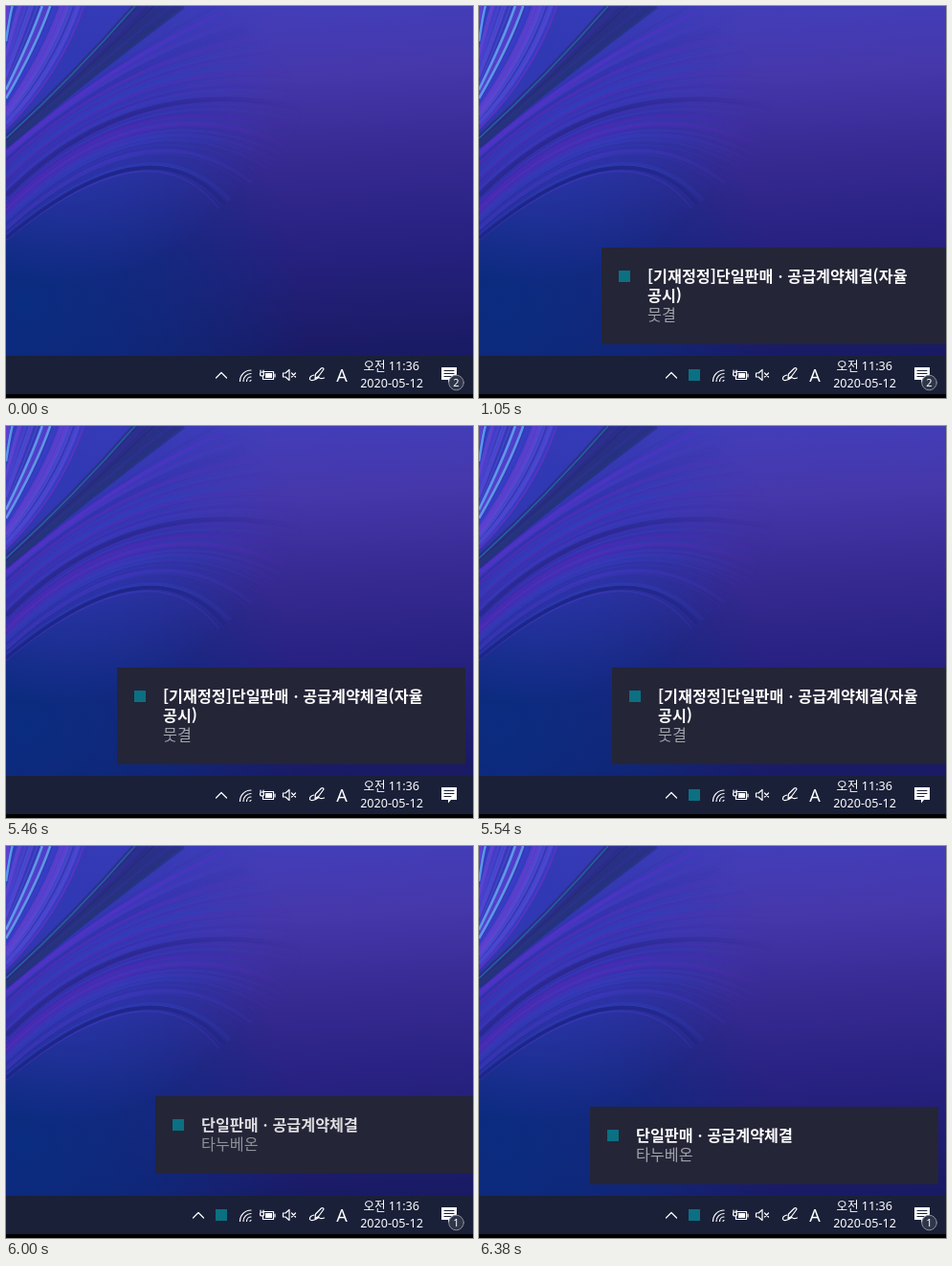
These frames come from a looping animation (488x409 px, 8 s). An HTML page with a canvas:

```html
<!DOCTYPE html>
<html lang="ko">
<head>
<meta charset="utf-8">
<title>Tray notification</title>
<style>
  html, body { margin: 0; width: 100%; height: 100%; overflow: hidden; background: #000; }
  canvas, svg { position: absolute; left: 0; top: 0; width: 488px; height: 409px; }
  canvas {
    background:
      radial-gradient(circle at 60px 70px, #3038b4, #3038b4a0 110px, #3038b400 220px),
      radial-gradient(circle at 20px 310px, #0a2c80, #0a2c80a0 145px, #0a2c8000 290px),
      linear-gradient(177deg, #413fbb, #4637ab 20%, #372a92 40%, #272180 62%, #181a62 90%);
  }
  svg { overflow: hidden; fill: none; stroke-linecap: round; stroke-linejoin: round; }
  text { fill: #fff; font-family: "Noto Sans", "Noto Sans CJK KR", sans-serif; }
  .tray text { text-anchor: middle; }
  .clock { font-size: 12.6px; }
  .toast text { font: 16.2px "Noto Sans CJK KR", "Noto Sans CJK", sans-serif; }
  .toast .title { font-weight: 700; }
  .toast .company { fill: #a2a2aa; }
  .toast .panel { fill: #242537; }
  .line { stroke: #fff; stroke-width: 1.2; }
  .solid { fill: #fff; }
  .app { fill: #0b7082; }
</style>
</head>
<body>
<canvas id="wallpaper" width="488" height="409"></canvas>
<svg viewBox="0 0 488 409">
  <g id="first" class="toast"></g>
  <g id="second" class="toast"></g>
  <g class="tray">
    <rect y="365" width="488" height="40" fill="#1a2038"/>
    <rect y="405" width="488" height="4" fill="#000"/>
    <path id="chevron" class="line" d="M219.5 388l5.5-5.5l5.5 5.5"/>
    <rect id="trayApp" class="app" x="219" y="379" width="12" height="12"/>
    <g id="wireless" class="line"></g>
    <g id="battery" class="line">
      <rect x="268.5" y="381.5" width="11" height="8"/>
      <rect class="solid" stroke="none" x="271" y="383" width="7" height="5"/>
      <path d="M281 384v3M266 380v2M269 380v2"/>
      <circle cx="267.5" cy="384" r="2" fill="#1a2038"/>
    </g>
    <path id="speaker" class="line" d="M289.5 383h2.5l4-3.5v11l-4-3.5h-2.5zM298.5 383l4 4m0-4l-4 4"/>
    <path id="pen" class="line" d="M323 388.5l.5-4.5l6-6q2-1 2.5 1l-5.5 7.5zM322 385q-5 1-4.5 4.5q2 3 9.5-2q1.500 2 5.500 .5"/>
    <text x="351" y="392" font-size="18">A</text>
    <text class="clock" x="402.7" y="380">오전 11:36</text>
    <text class="clock" x="403" y="398">2020-05-12</text>
    <path class="solid" d="M455 377h16v13h-6l-3 3.500v-3.500h-7z"/>
    <path stroke="#1a2038" d="M458 380.500h10m-10 3h10m-10 3h7"/>
    <g id="badge">
      <circle cx="470.5" cy="393" r="7.8" fill="#30364a" stroke="#8a8e9a"/>
      <text id="count" x="470.5" y="397" font-size="11"></text>
    </g>
  </g>
</svg>
<script>
const $ = id => document.getElementById(id);

function paintWallpaper() {
  const ctx = $('wallpaper').getContext('2d');
  let seed = 7;
  const random = () => (seed = seed * 16807 % 2147483647) / 2147483647;
  const pick = list => list[Math.floor(random() * list.length)];

  // Each family maps m (0 to 1) to the start, control and end of one strand.
  const fan = m => [0, 130 * Math.sqrt(m), 58 * m, 75 * m, 84 * m, 0];
  const wedge = m => [0, 138 + 8 * m, 72 + 16 * m, 72, 135 + 52 * m, 0];
  const sweep = m => [0, 150 + 95 * m, 110 + 42 * m, 58 + 63 * m ** 3,
    220 + 90 * Math.sin(Math.PI * m), 213 * m];

  function strand([x, y, ...rest], color, width, alpha) {
    const fade = ctx.createLinearGradient(120, 0, 310, 0);
    fade.addColorStop(0, color);
    fade.addColorStop(1, color + '00');
    ctx.strokeStyle = fade;
    ctx.globalAlpha = alpha;
    ctx.lineWidth = width;
    ctx.beginPath();
    ctx.moveTo(x, y);
    ctx.quadraticCurveTo(...rest);
    ctx.stroke();
  }
  function bundle(family, count, colors, alpha) {
    for (let i = 0; i < count; i++) {
      const m = (i + random()) / count;
      strand(family(m), pick(colors), 1 + 4 * random(), alpha * (.5 + random() / 2));
    }
  }

  ctx.filter = 'blur(0.7px)';
  bundle(sweep, 60, ['#4a3fcc', '#5a2cbc', '#3440c0', '#3430ac', '#3a2cae'], .5);
  strand(sweep(.03), '#5a30c8', 4, .7);
  strand(sweep(.5), '#28278a', 5, .75);
  strand(sweep(.62), '#5526b4', 4, .6);
  strand(sweep(.97), '#1c2382', 4, .8);

  for (let m = 0; m <= 1; m += .08) strand(wedge(m), '#2a2f88', 6, .8);
  bundle(wedge, 9, ['#252a70', '#34319a', '#243578'], .6);
  strand(wedge(0), '#2468a2', 1.6, .9);

  bundle(fan, 30, ['#5a45d4', '#3a3fce', '#6a40d0', '#3436b4', '#4b55dc'], .8);
  for (const m of [.08, .45, .55]) strand(fan(m), '#62a9ee', 2.5, .85);
  strand(fan(.97), '#5a32bd', 2, .8);
}

function buildToast(id, titleLines, company) {
  const lines = [...titleLines, company];
  const texts = lines.map((line, i) => {
    const kind = i < titleLines.length ? 'title' : 'company';
    return `<text class="${kind}" x="48" y="${36 + 20 * i}">${line}</text>`;
  });
  $(id).innerHTML = `<rect class="panel" width="364" height="${41 + 20 * lines.length}"/>
    <rect class="app" x="18" y="24" width="12" height="12"/><g>${texts.join('')}</g>`;
}

function buildWireless() {
  const arcs = [1, 4.5, 8, 11.5].map(r =>
    `<path d="M${256 - r} 391.5a${r} ${r} 0 0 1 ${r} ${-r}"/>`);
  $('wireless').innerHTML = arcs.join('');
}

const REST_X = 116, WIDTH = 372, DECAY = .94;
const HIDDEN = { x: 488, y: 252 };

// The screen refreshes in discrete ticks of 77 ms while toasts move.
const tick = (t, start) => Math.floor((t - start) / 77);

function firstToast(t) {
  const enter = tick(t, 813), leave = tick(t, 5455);
  if (enter < 0 || leave >= 4) return HIDDEN;
  const offset = leave > 0 ? WIDTH * (leave / 4) ** 2 : 198 * Math.exp(-DECAY * enter);
  return { x: REST_X + offset, y: 252 };
}

// Slides in half a line too high, then settles down.
function secondToast(t) {
  const step = tick(t, 5840);
  if (step < 0) return HIDDEN;
  const rest = Math.exp(-DECAY * step);
  const settle = Math.min(Math.max(step - 5, 0) / 2, 1);
  return { x: REST_X + 263 * rest, y: 262 - 6 * rest + 10 * settle };
}

function place(id, { x, y }) {
  $(id).setAttribute('transform', `translate(${Math.round(x)} ${Math.round(y)})`);
}
const show = (id, visible) => $(id).setAttribute('visibility', visible ? 'visible' : 'hidden');

function render(t) {
  const appInTray = t >= 500 && t < 5460 || t >= 5540;
  place('first', firstToast(t));
  place('second', secondToast(t));
  $('second').lastChild.setAttribute('opacity', t < 6310 ? .85 : 1);
  show('trayApp', appInTray);
  $('chevron').setAttribute('transform', `translate(${appInTray ? -24 : 0} 0)`);
  show('badge', t < 5460 || t >= 5840);
  $('count').textContent = t < 5460 ? '2' : '1';
}

paintWallpaper();
buildWireless();
buildToast('first', ['[기재정정]단일판매ㆍ공급계약체결(자율', '공시)'], '뭇결');
buildToast('second', ['단일판매ㆍ공급계약체결'], '타누베온');

const begin = performance.now();
(function loop() {
  render((performance.now() - begin) % 8000);
  requestAnimationFrame(loop);
})();
</script>
</body>
</html>
```
